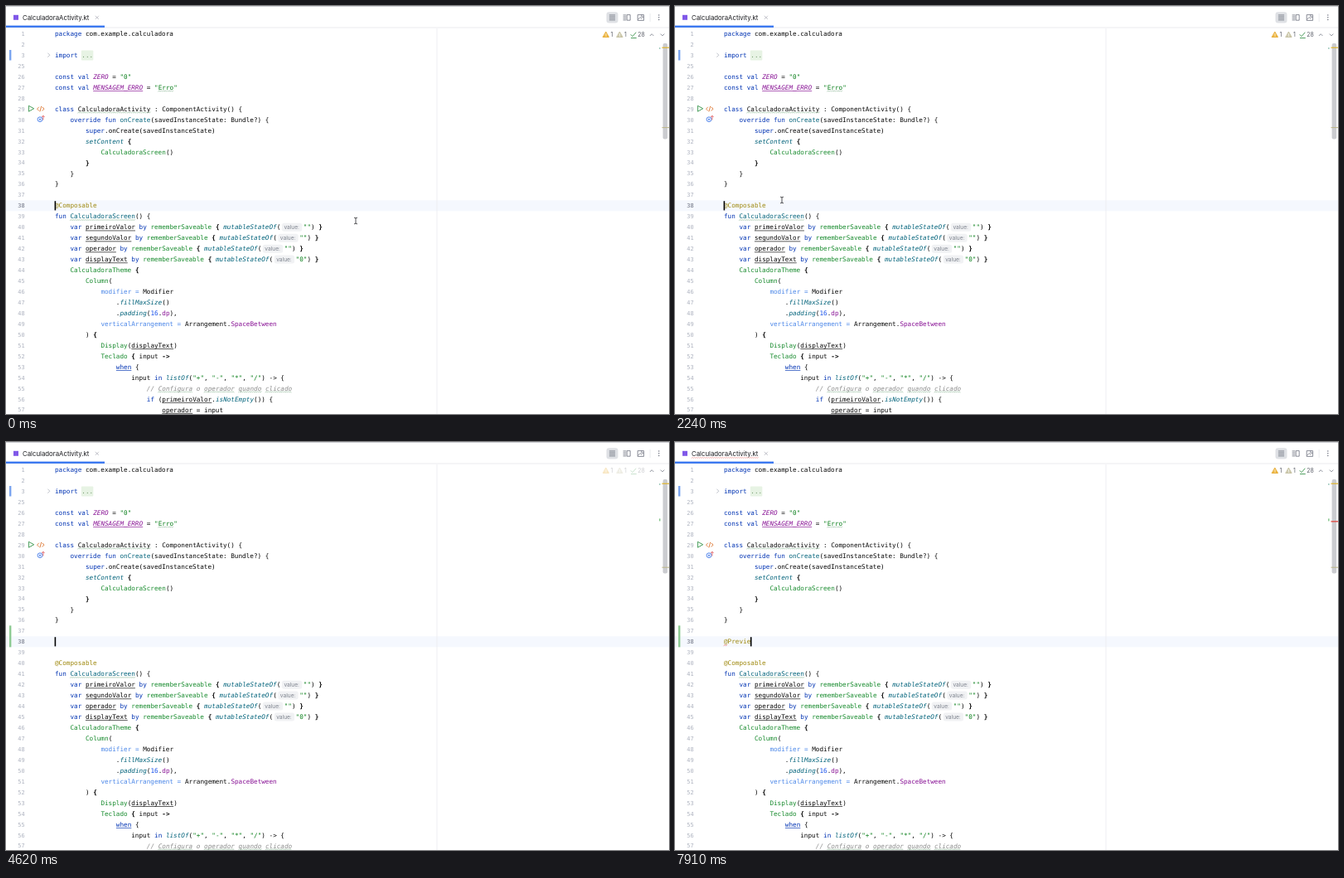
An HTML page for the animation above (8 s loop, 800x492 px).

```html
<!DOCTYPE html>
<html lang="pt">
<head>
<meta charset="utf-8">
<title>Editor</title>
<style>
html, body { margin: 0; width: 100%; height: 100%; overflow: hidden; background: #fff; }
svg { display: block; width: 100vw; height: 100vh; }
text { white-space: pre; }
.code { font-family: "DejaVu Sans Mono", "Noto Sans Mono", monospace; font-size: 7.67px; }
.ui { font-family: Inter, sans-serif; }
.line { fill: none; stroke-linecap: round; stroke-linejoin: round; }
</style>
</head>
<body>
<svg id="stage" viewBox="0 0 800 492"></svg>
<script>
const NS = 'http://www.w3.org/2000/svg';
const LOOP = 8000, STEP = 70;
const LEFT = 59, CW = 4.617, TOP = 33.5, ROW = 12.957, SPLIT = 16;
const rowY = r => TOP + r * ROW;

const COLORS = {
  p: '#080808', b: '#080808', k: '#0033b3', s: '#067d17', f: '#00627a', i: '#00627a',
  g: '#168a2c', c: '#871094', v: '#871094', a: '#9e880d', n: '#1750eb', o: '#8c8c8c', m: '#4a86e8'
};
const ITALIC = 'ico';

// Marked runs are ^style:text^. A second letter adds an underline (u) or a typo wave (w).
const remember = (name, value) =>
  `    ^k:var^ ^pu:${name}^ ^k:by^ ^g:rememberSaveable^ ^b:{^ ^i:mutableStateOf^(^h:value:^^s:${value}^) ^b:}^`;

const SOURCE = [
  '^k:package^ com.example.calculadora',
  '',
  '^k:import^ ^d:...^',
  '',
  '^k:const val^ ^c:ZERO^ = ^s:"0"^',
  '^k:const val^ ^cu:MENSAGEM_ERRO^ = ^s:"^^sw:Erro^^s:"^',
  '',
  '^k:class^ ^pw:CalculadoraActivity^ : ComponentActivity() {',
  '    ^k:override fun^ ^f:onCreate^(savedInstanceState: Bundle?) {',
  '        ^k:super^.onCreate(savedInstanceState)',
  '        ^i:setContent^ ^b:{^',
  '            ^g:CalculadoraScreen^()',
  '        ^b:}^',
  '    }',
  '}',
  '',
  '^a:@Composable^',
  '^k:fun^ ^fw:CalculadoraScreen^() {',
  remember('primeiroValor', '""'),
  remember('segundoValor', '""'),
  remember('operador', '""'),
  remember('displayText', '"0"'),
  '    ^g:CalculadoraTheme^ ^b:{^',
  '        ^g:Column^(',
  '            ^m:modifier =^ Modifier',
  '                .^i:fillMaxSize^()',
  '                .^i:padding^(^n:16^.^v:dp^),',
  '            ^m:verticalArrangement =^ Arrangement.^v:SpaceBetween^',
  '        ) ^b:{^',
  '            ^g:Display^(^pu:displayText^)',
  '            ^g:Teclado^ ^b:{^ input ^b:->^',
  '                ^ku:when^ {',
  '                    input ^k:in^ ^i:listOf^(^s:"+"^, ^s:"-"^, ^s:"*"^, ^s:"/"^) -> {',
  '                        ^o:// ^^ow:Configura^^o: o ^^ow:operador^^o: ^^ow:quando^^o: ^^ow:clicado^',
  '                        ^k:if^ (^pu:primeiroValor^.^i:isNotEmpty^()) {',
  '                            ^pu:operador^ = input'
];

function add(parent, tag, attrs = {}, text) {
  const el = document.createElementNS(NS, tag);
  for (const key in attrs) el.setAttribute(key, attrs[key]);
  if (text !== undefined) el.textContent = text;
  parent.append(el);
  return el;
}
const rect = (parent, x, y, width, height, fill, rx = 0) =>
  add(parent, 'rect', { x, y, width, height, fill, rx });
const path = (parent, d, stroke, width = 0.9) =>
  add(parent, 'path', { d, stroke, class: 'line', 'stroke-width': width });
const label = (parent, x, y, size, fill, text) =>
  add(parent, 'text', { x, y, fill, class: 'ui', 'font-size': size }, text);

function wave(parent, x, y, width, color) {
  let d = `M${x} ${y}`;
  for (let i = 1; i * 1.2 <= width; i++) d += `L${(x + i * 1.2).toFixed(1)} ${y - (i % 2) * 0.9}`;
  return path(parent, d, color, 0.5);
}

function drawLine(parent, source, row) {
  const y = rowY(row);
  let x = LEFT;
  source.split('^').forEach((part, i) => {
    if (!part) return;
    const marked = i % 2;
    const cut = part.indexOf(':');
    const style = marked ? part.slice(0, cut) : 'p';
    const text = marked ? part.slice(cut + 1) : part;
    const kind = style[0], width = text.length * CW;
    if (kind === 'h') {
      rect(parent, x + 1.6, y - 5, 24.2, 10, '#f1f2f4', 2.5);
      label(parent, x + 4, y + 2.2, 6.6, '#7b808c', text);
      x += 27.4;
      return;
    }
    if (kind === 'd') rect(parent, x - 0.5, y - 6, 14.5, 12, '#e7f3e4', 1);
    add(parent, 'text', {
      x, y: y + 2.6, class: 'code', fill: kind === 'd' ? '#6e9669' : COLORS[kind],
      'font-weight': kind === 'b' ? 700 : 400,
      'font-style': ITALIC.includes(kind) ? 'italic' : 'normal'
    }, text);
    if (style[1] === 'u') rect(parent, x, y + 3.9, width, 0.65, COLORS[kind]);
    if (style[1] === 'w') wave(parent, x, y + 4.7, width, '#6fa37b');
    x += width;
  });
}

const svg = document.getElementById('stage');
rect(svg, 0, 0, 800, 492, '#fff');

// Editor surface
const rowBand = rect(svg, 0, 0, 800, 13, '#f5f8fe');
rect(svg, 519.6, 27, 0.8, 465, '#ececef');
const above = add(svg, 'g'), below = add(svg, 'g');
SOURCE.forEach((line, r) => drawLine(r < SPLIT ? above : below, line, r));

const typed = add(svg, 'text', { x: LEFT, y: rowY(SPLIT) + 2.6, class: 'code', fill: COLORS.a });
const errorWave = wave(svg, LEFT, rowY(SPLIT) + 4.7, CW, '#e5332a');

// Gutter
const numbers = SOURCE.map((_, r) => add(svg, 'text', {
  x: 22.6, y: rowY(r) + 2.5, class: 'code', 'text-anchor': 'end', style: 'font-size:6.9px'
}, r < 3 ? r + 1 : r + 22));
rect(svg, 4, 53, 2.4, 12.5, '#7ba5f0');
const addedMark = rect(svg, 4, rowY(15) - 6.5, 2.4, 13, '#8ecb94');
path(svg, 'M50.7 57l2.1 2.2-2.1 2.2', '#a3a7b3', 0.7);
add(svg, 'path', { d: 'M27.4 120.6v6.6l6-3.3z', class: 'line', stroke: '#3b9650', 'stroke-width': 0.9, style: 'fill:#f0faf1' });
path(svg, 'M39.6 122l-2 2.1 2 2.1M44 122l2 2.1-2 2.1M42.6 121.2l-1.6 5.8', '#dc752f');
add(svg, 'circle', { cx: 41, cy: 136.7, r: 2.9, fill: '#edf3ff', stroke: '#4a7fe8', 'stroke-width': 0.9 });
add(svg, 'circle', { cx: 41, cy: 136.7, r: 1, fill: '#4a7fe8' });
path(svg, 'M44.9 137v-4.4M43.5 133.7l1.4-1.4 1.4 1.4', '#dc4a50', 0.8);

// Tab bar
rect(svg, 0, 0, 800, 27, '#fff');
rect(svg, 0, 0, 800, 0.9, '#c8c9ce');
rect(svg, 0, 25.6, 800, 0.8, '#e6e7eb');
rect(svg, 0, 23.6, 119, 2.3, '#3574f0');
rect(svg, 9, 10.8, 6, 6, '#8058e8');
label(svg, 20, 16.8, 7.8, '#1b1c20', 'CalculadoraActivity.kt');
const tabWave = wave(svg, 20, 19.4, 81, '#e86b66');
path(svg, 'M108 12.1l3.6 3.6M111.6 12.1l-3.6 3.6', '#9a9da8', 0.6);

// Toolbar
const INK = '#6c707e';
rect(svg, 724.5, 7.2, 14, 13.4, '#dfe1e5', 3);
path(svg, 'M728.3 10.9h6.4M728.3 12.9h6.4M728.3 14.9h6.4M728.3 16.9h6.4', INK, 0.8);
path(svg, 'M745 10.9h3M745 12.9h3M745 14.9h3M745 16.9h3M749.6 10.6h3.6v6.6h-3.6z', INK, 0.8);
path(svg, 'M762.6 10.6h7v6.8h-7zM762.8 16l2.4-2.4 1.8 1.6M767 10.8v2.4h2.4', INK, 0.8);
rect(svg, 776.8, 9, 0.6, 10, '#dcdee3');
for (const y of [11, 13.8, 16.6]) add(svg, 'circle', { cx: 787.8, cy: y, r: 0.75, fill: INK });

// Inspection summary
const summary = add(svg, 'g');
const warning = (x, fill, stroke) => {
  add(summary, 'path', { d: `M${x} 31.4l3.5 6.1h-7z`, class: 'line', stroke, 'stroke-width': 0.9, style: `fill:${fill}` });
  path(summary, `M${x} 33.6v1.7M${x} 36.5v.1`, '#fff', 0.8);
  label(summary, x + 5.4, 37.4, 7, '#5a5d68', '1');
};
warning(724, '#eeb63e', '#e5a82b');
warning(740.6, '#cdc9ac', '#c3bf9f');
path(summary, 'M754 34.6l2 2.1 4-4.6M754.4 38.6h6', '#4b9c5b', 1);
label(summary, 762.3, 37.4, 7, '#5a5d68', '28');
path(svg, 'M777.2 35.7l2-2 2 2M790.1 33.9l2 2 2-2', '#777b87', 0.8);

// Scrollbar and stripe marks
const thumb = rect(svg, 792.6, 45, 5.6, 115, '#cbccd0', 2);
rect(svg, 791.5, 49.6, 8.5, 1.2, '#dfb32c');
rect(svg, 788, 50, 1.6, 2, '#a9cfc4');
const farStripe = rect(svg, 791.5, 0, 8.5, 1, '#bdb588');
const addedStripe = rect(svg, 788, 92.4, 1.6, 3, '#8ecb94');
const errorStripe = rect(svg, 791.5, 95.2, 8.5, 1.3, '#e0453d');

const bulb = add(svg, 'g');
add(bulb, 'path', { d: 'M64.8 228.2c0-1.2-1.7-1.8-1.7-3.4a3.4 3.4 0 0 1 6.8 0c0 1.6-1.7 2.2-1.7 3.4z', fill: '#f2a823' });
rect(bulb, 64.9, 229, 3.2, 0.9, '#7d7465');
rect(bulb, 65.4, 230.4, 2.2, 0.8, '#7d7465');

const caret = rect(svg, 0, 0, 1.6, 11.2, '#000');
const pointer = add(svg, 'g');
path(pointer, 'M-1.6-3.8Q0-3.8 0-2.8Q0-3.8 1.6-3.8M0-2.8V2.8M-1.6 3.8Q0 3.8 0 2.8Q0 3.8 1.6 3.8', '#26272b', 0.8);

// Timeline
const CLICK = 2450, ENTER1 = 3500, ENTER2 = 4130, UP = 4550, TYPE = 6860, FAIL = 7280;
const CARET_ON = [[0, 350], [840, 1400], [1890, 2380], [CLICK, 2940], [ENTER1, 3990],
  [ENTER2, 5040], [5670, 6160], [6510, LOOP]];
const BUSY = [[3570, 3640], [4620, 5110], [7000, 7210]];
const KEYS = [[6860, 1], [7420, 2], [7490, 3], [7770, 4], [7840, 5], [7910, 7]];
const MOVES = [[0, 422, 259], [350, 408, 256], [840, 408, 256], [1330, 133, 241],
  [2030, 133, 241], [2450, 125, 227], [LOOP, 125, 227]];

const within = (spans, t) => spans.some(([from, to]) => t >= from && t < to);
const show = (el, on) => el.setAttribute('visibility', on ? 'visible' : 'hidden');

function pointerAt(t) {
  const i = MOVES.findIndex(m => m[0] > t);
  const [t0, x0, y0] = MOVES[i - 1], [t1, x1, y1] = MOVES[i];
  const u = (t - t0) / (t1 - t0), e = u * u * (3 - 2 * u);
  return [x0 + (x1 - x0) * e, y0 + (y1 - y0) * e];
}

function render(t) {
  const added = (t >= ENTER1) + (t >= ENTER2);
  const row = t < CLICK ? 16 : t < ENTER1 ? 15 : t >= ENTER2 && t < UP ? 17 : 16;
  const count = KEYS.reduce((n, [at, length]) => t >= at ? length : n, 0);
  const failed = t >= FAIL;

  below.setAttribute('transform', `translate(0 ${added * ROW})`);
  rowBand.setAttribute('y', rowY(row) - 6.5);
  numbers.forEach((el, r) => el.setAttribute('fill', r === row ? '#686d7d' : '#adb2bf'));

  typed.textContent = '@Preview'.slice(0, count);
  caret.setAttribute('x', LEFT - 0.4 + count * CW);
  caret.setAttribute('y', rowY(row) - 5.6);
  show(caret, within(CARET_ON, t));

  addedMark.setAttribute('height', added > 1 ? 26 : 13);
  show(addedMark, added);
  show(addedStripe, added);
  thumb.setAttribute('height', 115.5 - added);
  farStripe.setAttribute('y', 146.1 + added * 2.3);

  show(errorWave, failed);
  show(errorStripe, failed);
  show(tabWave, failed);
  show(bulb, t >= 5390 && t < TYPE);
  summary.setAttribute('opacity', within(BUSY, t) ? 0.3 : 1);

  pointer.setAttribute('transform', `translate(${pointerAt(t)})`);
  show(pointer, t < ENTER1);
}

const start = performance.now();
function tick() {
  const t = (performance.now() - start) % LOOP;
  render(Math.floor(t / STEP) * STEP);
  requestAnimationFrame(tick);
}
tick();
</script>
</body>
</html>
```
